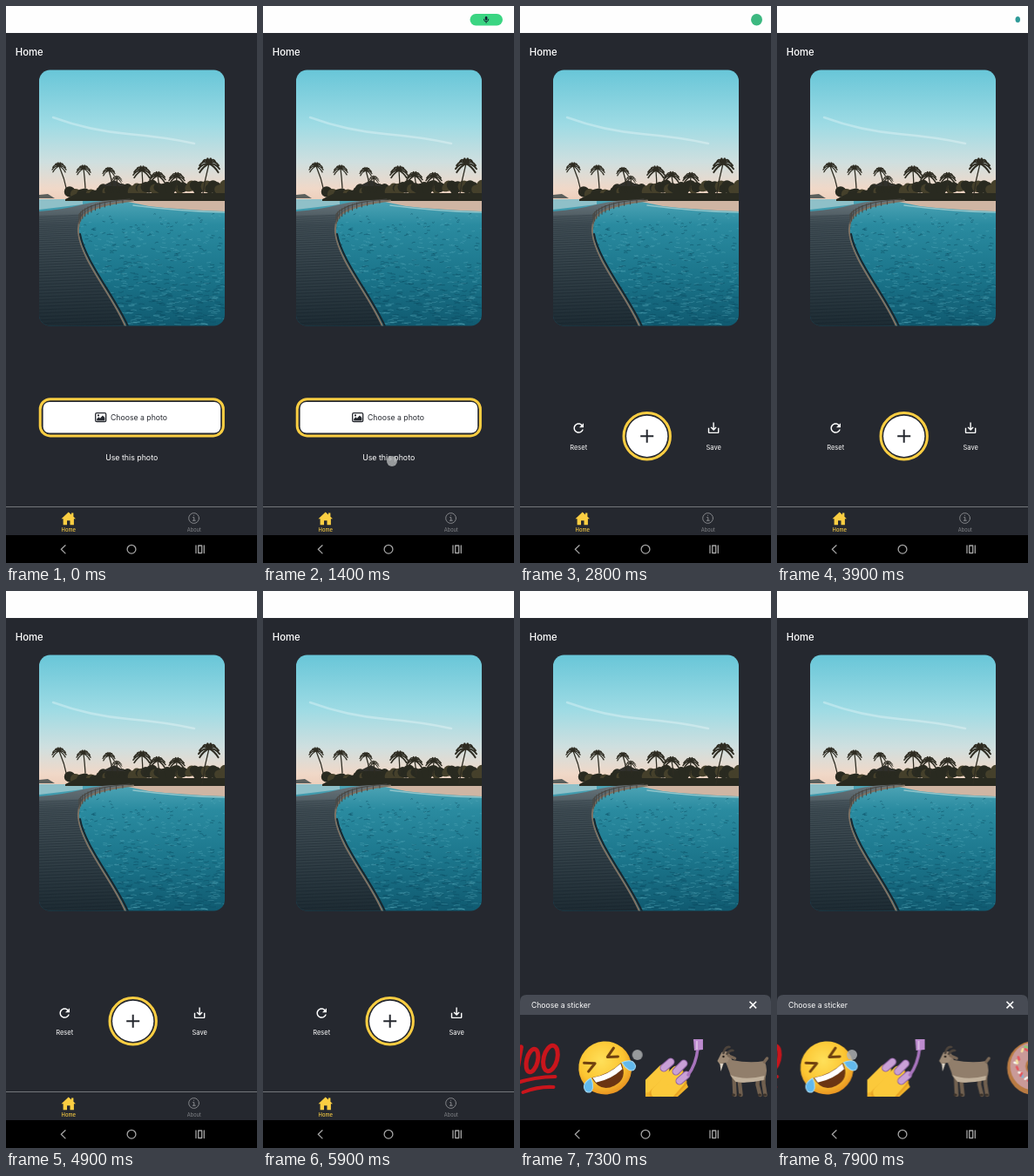
Recreate the animation shown at these times as an HTML page. Size 288 by 640 pixels, loop 8000 ms.

```html
<!DOCTYPE html>
<html lang="en">
<head>
<meta charset="utf-8">
<title>Sticker app</title>
<style>
  html, body { margin: 0; width: 100%; height: 100%; overflow: hidden; background: #25282f; }
  svg { display: block; width: 288px; height: 640px; }
  text { font-family: Inter, "Open Sans", sans-serif; fill: #fff; }
  .mid { text-anchor: middle; }
  .line { fill: none; stroke-linecap: round; stroke-linejoin: round; }
  .anim { animation: 8s linear infinite; }

  #chip { animation-name: chip; }
  #mic { animation-name: mic; }
  #start { animation-name: start; }
  #tools { animation-name: tools; }
  #sheet { animation-name: sheet; }
  #row { animation-name: row; }
  #touch { animation-name: touch; }

  @keyframes chip {
    0%, 3.75% { x: 268px; y: 9px; width: 7px; height: 13.5px; fill: #3bd582; opacity: 0; }
    6.25%, 32.5% { x: 237.5px; y: 9px; width: 37.5px; height: 13.5px; fill: #3bd582; opacity: 1; }
    35% { x: 265px; y: 9px; width: 13px; height: 13.5px; fill: #3cb880; opacity: 1; }
    37.5%, 51.5% { x: 273.5px; y: 12px; width: 5.5px; height: 7px; fill: #2f9b99; opacity: 1; }
    52.5%, 100% { x: 273.5px; y: 12px; width: 5.5px; height: 7px; fill: #2f9b99; opacity: 0; }
  }
  @keyframes mic {
    0%, 5% { opacity: 0; }
    6.25%, 32.5% { opacity: 1; }
    33.75%, 100% { opacity: 0; }
  }
  @keyframes start {
    0%, 19.99% { visibility: visible; }
    20%, 100% { visibility: hidden; }
  }
  @keyframes tools {
    0%, 19.99% { visibility: hidden; }
    20%, 100% { visibility: visible; }
  }
  @keyframes sheet {
    0%, 77% { transform: translateY(176px); animation-timing-function: ease-out; }
    81.5%, 100% { transform: none; }
  }
  @keyframes row {
    0%, 86% { transform: none; animation-timing-function: ease-in-out; }
    97.5%, 100% { transform: translateX(-70.5px); }
  }
  @keyframes touch {
    0%, 16.24% { transform: translate(148px, 523px); opacity: 0; }
    16.25%, 18.99% { transform: translate(148px, 523px); opacity: 1; }
    19%, 74.99% { transform: translate(148px, 523px); opacity: 0; }
    75%, 76.99% { transform: translate(149px, 498px); opacity: 1; }
    77%, 83.74% { transform: translate(171px, 533px); opacity: 0; }
    83.75%, 86% { transform: translate(171px, 533px); opacity: 1; animation-timing-function: ease-in-out; }
    97.5%, 100% { transform: translate(86px, 533px); opacity: 1; }
  }
</style>
</head>
<body>
<svg viewBox="0 0 288 640">
  <defs>
    <linearGradient id="sky" x2="0" y2="1">
      <stop offset="0" stop-color="#68c6d8"/>
      <stop offset=".42" stop-color="#9edbe4"/>
      <stop offset=".7" stop-color="#cfdfdf"/>
      <stop offset=".9" stop-color="#f0d8c8"/>
      <stop offset="1" stop-color="#edcdb9"/>
    </linearGradient>
    <linearGradient id="sea" x2="0" y2="1">
      <stop offset="0" stop-color="#4fa5b6"/>
      <stop offset=".2" stop-color="#2a8ba0"/>
      <stop offset=".6" stop-color="#1b758b"/>
      <stop offset="1" stop-color="#105a70"/>
    </linearGradient>
    <linearGradient id="deck" x2="0" y2="1">
      <stop offset="0" stop-color="#69767c"/>
      <stop offset=".2" stop-color="#435057"/>
      <stop offset="1" stop-color="#1d2b33"/>
    </linearGradient>
    <radialGradient id="face" cx=".5" cy=".35" r=".65">
      <stop offset="0" stop-color="#ffe05a"/>
      <stop offset=".65" stop-color="#fcc531"/>
      <stop offset="1" stop-color="#e99422"/>
    </radialGradient>
    <clipPath id="frame"><rect x="38" y="73.5" width="213" height="294" rx="12.5"/></clipPath>
    <clipPath id="pier"><path id="pierShape" d="M38 236Q66 234 88 228Q112 222 146 223Q108 228 93 237Q82 244 83 260C86 292 122 332 137 368H38z"/></clipPath>
    <clipPath id="tile"><rect x="-33" y="-33" width="66" height="66"/></clipPath>
  </defs>

  <rect width="288" height="640" fill="#25282f"/>
  <rect width="288" height="31" fill="#fefefe"/>
  <rect id="chip" class="anim" rx="6.75" opacity="0"/>
  <g id="mic" class="anim" opacity="0">
    <rect x="254.8" y="12" width="2.6" height="4.6" rx="1.3" fill="#123"/>
    <path class="line" d="M253.4 15.2q0 2.8 2.7 2.8t2.7-2.8M256.1 18v1.4" stroke="#123" stroke-width=".9"/>
  </g>
  <text x="10.8" y="57" font-size="11.3" font-weight="500">Home</text>

  <g clip-path="url(#frame)">
    <rect x="38" y="73" width="213" height="152" fill="url(#sky)"/>
    <path class="line" d="M54 128Q95 143 140 147T216 158" stroke="#fff" stroke-opacity=".3" stroke-width="2.5"/>
    <rect x="38" y="222" width="213" height="146" fill="url(#sea)"/>
    <path d="M38 222h50v6l-50 6z" fill="#8fc0c8"/>
    <path d="M38 217l10-1 8 5H38z" fill="#5b5f5c"/>
    <path d="M130 223H251V236Q200 234 164 230z" fill="#cfb5a3"/>
    <path class="line" d="M146 229Q200 236 251 237" stroke="#8fc5cb" stroke-width="1.5"/>
    <g id="ripples" class="line"></g>
    <g id="trees" fill="#292a20"></g>
    <g id="palms" class="line" stroke="#2e2c22"></g>
    <use href="#pierShape" fill="url(#deck)"/>
    <path id="planks" clip-path="url(#pier)" class="line" stroke="#0f1c24" stroke-opacity=".42" stroke-width=".8"/>
    <path class="line" d="M146 223.5Q108 228 93 237Q82 244 83 260C86 292 122 332 137 368" stroke="#7d7264" stroke-width="2"/>
    <path class="line" d="M85 262C90 292 125 334 140 368" stroke="#17272f" stroke-width="2"/>
    <path id="rails" class="line" stroke="#4a4742" stroke-width="1.1"/>
  </g>

  <g id="start" class="anim">
    <rect x="39.2" y="451.7" width="210.2" height="42.2" rx="11.5" fill="none" stroke="#fbce42" stroke-width="3"/>
    <rect x="42.6" y="455" width="203.6" height="35.6" rx="7" fill="#fff"/>
    <rect x="102.7" y="467.7" width="12" height="10" rx="1.4" fill="none" stroke="#25282f" stroke-width="1.3"/>
    <path d="M104.2 476.4v-2l2.2-2.2 1.5 1.5 3-3.2 2.5 2.5v3.4z" fill="#25282f"/>
    <circle cx="106" cy="470.4" r="1.1" fill="#25282f"/>
    <text x="120" y="476.2" font-size="8.7" style="fill:#25282f">Choose a photo</text>
    <text class="mid" x="144.2" y="521.8" font-size="8.8">Use this photo</text>
  </g>

  <g id="tools" class="anim" visibility="hidden">
    <circle cx="145.7" cy="494.3" r="26.7" fill="none" stroke="#fbce42" stroke-width="3"/>
    <circle cx="145.7" cy="494.3" r="23.6" fill="#fff"/>
    <path d="M138.2 494.3h15m-7.5-7.5v15" stroke="#25282f" stroke-width="2"/>
    <path transform="translate(58.6 476.4) scale(.72)" fill="#fff" d="M17.65 6.35C16.2 4.9 14.21 4 12 4c-4.42 0-7.99 3.58-7.99 8s3.57 8 7.99 8c3.73 0 6.84-2.55 7.73-6h-2.08c-.82 2.33-3.04 4-5.65 4-3.31 0-6-2.69-6-6s2.69-6 6-6c1.66 0 3.14.69 4.22 1.78L13 11h7V4z"/>
    <path transform="translate(213.7 476.4) scale(.7)" fill="#fff" d="M19 12v7H5v-7H3v7c0 1.1.9 2 2 2h14c1.1 0 2-.9 2-2v-7zm-6 .67l2.59-2.58L17 11.5l-5 5-5-5 1.41-1.41L11 12.67V3h2z"/>
    <text class="mid" x="67.2" y="509.6" font-size="7.5">Reset</text>
    <text class="mid" x="222.2" y="509.6" font-size="7.5">Save</text>
  </g>

  <path d="M0 575.5h288" stroke="#73767a"/>
  <path d="M63.5 589.2L71.7 581.6 75 584.6V582.4H77.4V586.8L80 589.2H77.9V596.2H73.5V591.2H70V596.2H65.6V589.2z" fill="#fbce42"/>
  <text class="mid" x="71.8" y="604" font-size="5.8" font-weight="500" style="fill:#fbce42">Home</text>
  <g class="line" stroke="#85878b">
    <circle cx="215.6" cy="588.5" r="5.9"/>
    <path d="M214.6 587.6h1.2v3.6m-1.5 0h3M215.5 585.2v.1"/>
  </g>
  <text class="mid" x="215.8" y="604" font-size="5.7" style="fill:#85878b">About</text>

  <g id="sheet" class="anim" transform="translate(0 176)">
    <path d="M0 487V471.5Q0 464 7.5 464H280.5Q288 464 288 471.5V487z" fill="#474b54"/>
    <rect y="487" width="288" height="153" fill="#25282f"/>
    <text x="13" y="478.6" font-size="8.6">Choose a sticker</text>
    <path d="M263.5 471.8l7.6 7.6m0-7.6l-7.6 7.6" stroke="#fff" stroke-width="1.6"/>
    <g id="row" class="anim">
      <g class="line" transform="translate(47.5 548)" stroke="#c9151c" stroke-width="5">
        <path d="M-24-15Q-19-19-16-24L-21 5"/>
        <ellipse cx="-3.5" cy="-8.5" rx="6.3" ry="13.5" transform="rotate(14 -3.5 -8.5)"/>
        <ellipse cx="17.5" cy="-11" rx="7.8" ry="15" transform="rotate(14 17.5 -11)"/>
        <path d="M-24 18Q0 10 23 10M-14 28Q4 21 21 22" stroke-width="4"/>
      </g>

      <g transform="translate(127.8 548) rotate(-27)">
        <circle r="30.5" fill="url(#face)"/>
        <path class="line" d="M-19-16L-8-10-19-5M19-16L8-10 19-5" stroke="#70410f" stroke-width="3"/>
        <path d="M-19 3Q0 9 19 3Q18 23 0 23T-19 3z" fill="#6b3513"/>
        <path d="M-18 3.500Q0 9 18 3.500L17 10Q0 15-17 10z" fill="#fff"/>
        <g fill="#62b9ec" stroke="#a9def8" stroke-width="1">
          <path d="M-20 3Q-34 4-32 14Q-28 20-23 14Q-20 9-20 3z"/>
          <path d="M20 3Q34 4 32 14Q28 20 23 14Q20 9 20 3z"/>
        </g>
      </g>

      <g transform="translate(207 548)"><g clip-path="url(#tile)">
        <path d="M-33 18L-16 6 12 12 16 22 4 33H-33z" fill="#f3b52b"/>
        <g class="line" stroke-width="13">
          <path d="M-32 22L-12 2" stroke="#fbc93b"/>
          <path d="M-22 30L4 5" stroke="#e7a323"/>
          <path d="M-20 28L3 4" stroke="#fbc93b"/>
          <path d="M-8 34L8 16" stroke="#e7a323"/>
          <path d="M-9 32L6 15" stroke="#fbc93b"/>
        </g>
        <g class="line" stroke="#8d5fa2" stroke-width="9">
          <path id="nails" d="M-12 0L-4-7M2 4L11-5M6 15L14 8"/>
        </g>
        <path class="line" d="M-12 0L-4-7M2 4L11-5M6 15L14 8" stroke="#c9a0d6" stroke-width="7"/>
        <path class="line" d="M27-22Q25-4 16 8" stroke="#a874bd" stroke-width="3.5"/>
        <path d="M22-33H33V-21L23-20z" fill="#bd8bcf"/>
        <path d="M26-31v10" stroke="#dab9e4" stroke-width="2"/>
      </g></g>

      <g transform="translate(285.5 548)">
        <g class="line" stroke="#71604f" stroke-width="4.500">
          <path d="M-10 10L-9 31M-4 12L-2 31M18 8L17 19 20 31M24 6L24 18 26 31"/>
        </g>
        <path d="M-24-16Q-16-18-12-9Q8-5 25-8Q30 2 25 14Q10 14 0 17Q-13 16-15 5L-18-3z" fill="#917e6b"/>
        <path d="M-14 8Q2 15 25 9L24 14Q6 18-8 16z" fill="#c0b09b"/>
        <path d="M-29-8L-24-18Q-17-21-14-14L-17-7-26-4z" fill="#9d8a76"/>
        <path d="M-26-5L-22-5-25 4z" fill="#ded4c6"/>
        <path class="line" d="M-22-17Q-20-25-15-24M-18-16Q-15-21-11-20" stroke="#4d443c" stroke-width="2.600"/>
        <path class="line" d="M-16-14L-9-11M25-7L28-11" stroke="#7a6857" stroke-width="3.500"/>
        <circle cx="-22" cy="-13" r="1.200" fill="#241d18"/>
        <path class="line" d="M-10 31h-1M-3 31h-1M19 31h1M25 31h1" stroke="#3c332b" stroke-width="3"/>
      </g>

      <g transform="translate(365.500 548)">
        <circle r="31" fill="#b97b43"/>
        <circle cy="-2" r="27.500" fill="#c99a98"/>
        <g id="sprinkles" class="line" stroke-width="2.600"></g>
        <circle cy="-2" r="10" fill="#b97b43"/>
        <circle cy="-1" r="7.500" fill="#25282f"/>
      </g>
    </g>
  </g>

  <rect y="608" width="288" height="32" fill="#000"/>
  <g class="line" stroke="#a4a4a4" stroke-width="1.300">
    <path d="M68 619.700L63.300 624.300 68 628.900"/>
    <circle cx="144" cy="624.200" r="4.900"/>
    <path d="M218 620v8.500M227.300 620v8.500M220.700 620h4v8.500h-4z"/>
  </g>
  <circle id="touch" class="anim" r="6" fill="#b4b6b8" fill-opacity=".8" opacity="0"/>
</svg>

<script>
  let seed = 7;
  const rand = (a = 0, b = 1) => {
    seed = (seed * 16807) % 2147483647;
    return a + (b - a) * seed / 2147483647;
  };
  const get = id => document.getElementById(id);
  const add = (id, tag, attrs) => {
    const el = document.createElementNS(get(id).namespaceURI, tag);
    for (const key in attrs) el.setAttribute(key, attrs[key]);
    get(id).append(el);
  };

  // Ripples grow toward the viewer.
  for (const [color, alpha] of [["#0b4b61", .5], ["#5cb0c0", .36]]) {
    let d = "";
    for (let i = 0; i < 320; i++) {
      const depth = rand() ** .8, w = 2 + depth * 5;
      d += `M${rand(82, 250)} ${239 + depth * 128}q${w / 2} ${rand(-1.5, 1.5)} ${w} ${rand(-1, 1)}`;
    }
    add("ripples", "path", { d, stroke: color, "stroke-opacity": alpha, "stroke-width": 1 });
  }

  for (let x = 73; x < 254; x += 3.5) {
    const top = x < 105 ? 214 : x < 150 ? 210 : 207;
    add("trees", "circle", { cx: x, cy: top + rand(-1, 4), r: rand(4, 7), fill: rand() < .3 ? "#45402b" : "#292a20" });
  }
  add("trees", "path", { d: "M68 222L82 215H251V224H68z" });
  add("trees", "path", { d: "M110 207L124 200 137 207z", fill: "#30302b" });

  // Crown x, y, frond length, trunk foot x, y.
  const palms = [
    [61, 184, 8, 70, 213], [89, 187, 8, 91, 209], [118, 189, 7, 122, 206], [156, 189, 10, 157, 209],
    [174, 195, 9, 176, 211], [196, 196, 9, 195, 212], [127, 198, 6, 128, 209], [233, 181, 12, 225, 222]
  ];
  for (const [x, y, s, fx, fy] of palms) {
    add("palms", "path", { d: `M${x} ${y}Q${x + (fx - x) * .7} ${(y + fy) / 2} ${fx} ${fy}`, "stroke-width": 1.3 });
    let d = "";
    for (let i = 0; i < 10; i++) {
      const a = Math.PI * (.85 + i * .145);
      const dx = Math.cos(a) * s, dy = Math.sin(a) * s * .75;
      d += `M${x} ${y}q${dx * .6} ${dy - 1} ${dx} ${dy + s * .5}`;
    }
    add("palms", "path", { d, "stroke-width": s / 6 });
  }

  let planks = "";
  for (let y = 239, step = 1.8; y < 370; y += step, step += .055) planks += `M36 ${y + 3}L142 ${y - 1}`;
  get("planks").setAttribute("d", planks);

  let rails = "M84 239Q96 225 142 222";
  for (let i = 0; i < 12; i++) {
    const t = i / 12;
    rails += `M${84 + 16 * t + 42 * t * t} ${239 - 28 * t + 11 * t * t}v${11 - 8 * t}`;
  }
  get("rails").setAttribute("d", rails);

  const candy = ["#f4e3a0", "#7fb5d8", "#e5575f", "#8fc878", "#f6f0ea"];
  for (let i = 0; i < 30; i++) {
    const a = i * 2.4, r = 13 + (i * 5 % 13), turn = rand(0, 6.3);
    add("sprinkles", "path", {
      d: `M${Math.cos(a) * r} ${Math.sin(a) * r - 2}l${Math.cos(turn) * 3} ${Math.sin(turn) * 3}`,
      stroke: candy[i % 5]
    });
  }
</script>
</body>
</html>
```
